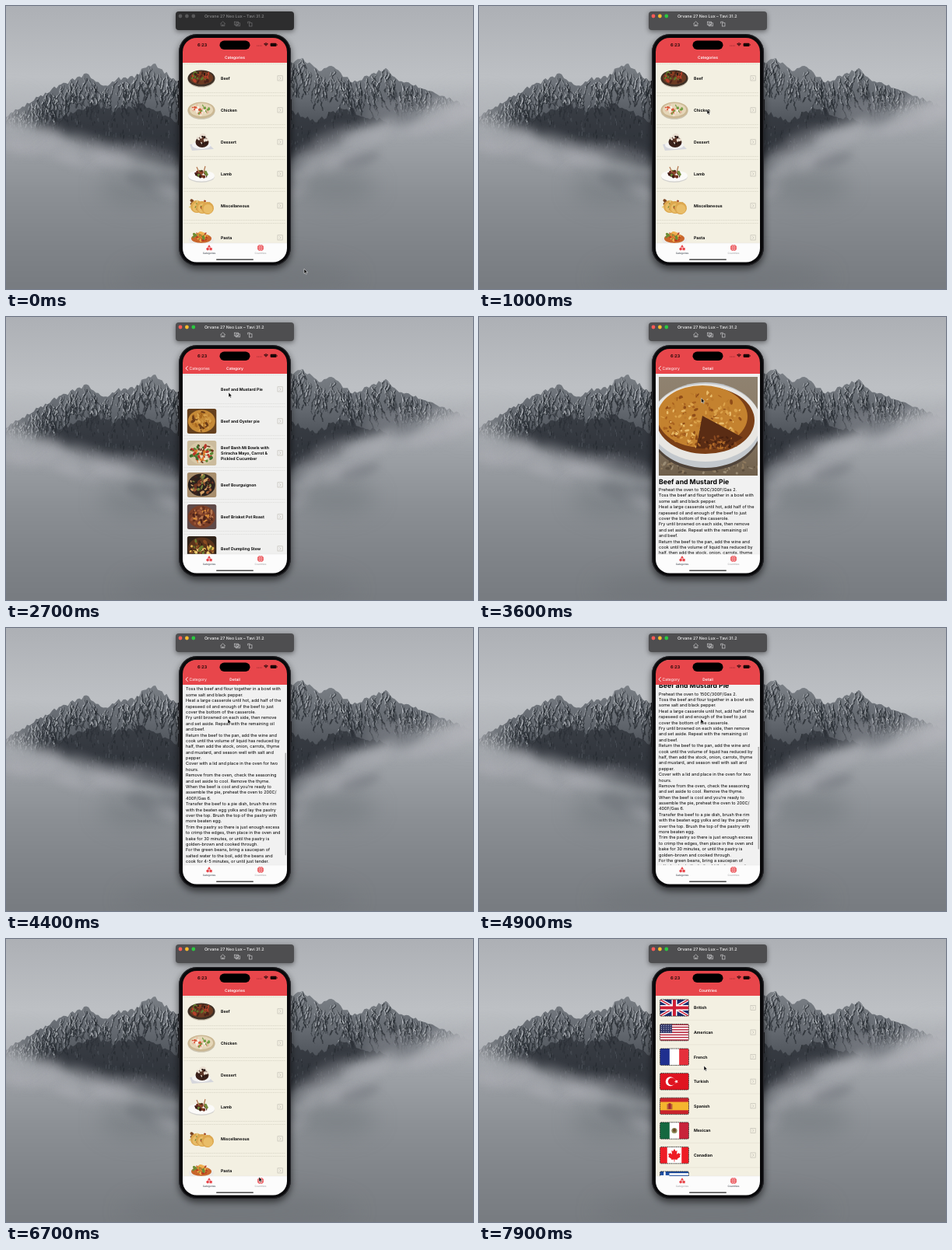
Animation of 600x364 px, one loop 8000 ms. Source, as an HTML page with a canvas:

```html
<!DOCTYPE html>
<html lang="en">
<head>
<meta charset="utf-8">
<title>Recipe app demo</title>
<style>
html, body { margin: 0; width: 100%; height: 100%; overflow: hidden; background: #8b8f93; }
canvas { display: block; width: 600px; height: 364px; }
</style>
</head>
<body>
<canvas id="stage"></canvas>
<script>
const W = 600, H = 364, LOOP = 8000, TAU = Math.PI * 2;
const SX = 227, SY = 41, SW = 134, TOP = 73, BOTTOM = 305;
const RED = '#e8464b';
const dpr = window.devicePixelRatio || 1;
const stage = document.getElementById('stage');
let ctx;

function prepare(canvas) {
  canvas.width = W * dpr;
  canvas.height = H * dpr;
  const c = canvas.getContext('2d');
  c.scale(dpr, dpr);
  c.textRendering = 'geometricPrecision';
  return c;
}

// ---------- helpers ----------
const clamp = (v, a = 0, b = 1) => Math.min(b, Math.max(a, v));
const smooth = u => u * u * (3 - 2 * u);

function random(seed) {
  return () => {
    seed = (seed + 0x6d2b79f5) | 0;
    let v = Math.imul(seed ^ (seed >>> 15), 1 | seed);
    v = (v + Math.imul(v ^ (v >>> 7), 61 | v)) ^ v;
    return ((v ^ (v >>> 14)) >>> 0) / 4294967296;
  };
}

// keys: [time, value...]; returns the eased values at t
function track(keys, t) {
  let i = 0;
  while (i < keys.length - 2 && t >= keys[i + 1][0]) i++;
  const a = keys[i], b = keys[i + 1];
  const u = smooth(clamp((t - a[0]) / (b[0] - a[0])));
  return a.slice(1).map((v, k) => v + (b[k + 1] - v) * u);
}

// critically damped transition
function spring(ms) {
  if (ms <= 0) return 0;
  const x = ms * 0.014;
  return x > 8 ? 1 : 1 - (1 + x) * Math.exp(-x);
}

function rect(x, y, w, h, fill) {
  ctx.fillStyle = fill;
  ctx.fillRect(x, y, w, h);
}

function round(x, y, w, h, r, fill) {
  ctx.beginPath();
  ctx.roundRect(x, y, w, h, r);
  if (fill) { ctx.fillStyle = fill; ctx.fill(); }
}

function oval(x, y, rx, ry, fill, turn = 0) {
  ctx.beginPath();
  ctx.ellipse(x, y, rx, ry, turn, 0, TAU);
  ctx.fillStyle = fill;
  ctx.fill();
}

function poly(points, fill) {
  ctx.beginPath();
  points.forEach(([x, y]) => ctx.lineTo(x, y));
  ctx.closePath();
  ctx.fillStyle = fill;
  ctx.fill();
}

function line(points, color, width) {
  ctx.beginPath();
  points.forEach(([x, y], i) => i ? ctx.lineTo(x, y) : ctx.moveTo(x, y));
  ctx.strokeStyle = color;
  ctx.lineWidth = width;
  ctx.stroke();
}

// y is the middle of the capitals
function text(str, x, y, size, weight, color, align = 'left') {
  ctx.font = `${weight} ${size}px Inter, "Liberation Sans", sans-serif`;
  ctx.textAlign = align;
  ctx.fillStyle = color;
  ctx.fillText(str, x, y + size * 0.36);
}

function clipped(path, draw) {
  ctx.save();
  path();
  ctx.clip();
  draw();
  ctx.restore();
}

// ---------- wallpaper ----------
function ridge(points, rough, seed) {
  const rnd = random(seed), out = [];
  for (let i = 0; i < points.length - 1; i++) {
    const [x0, y0] = points[i], [x1, y1] = points[i + 1];
    const n = Math.max(1, Math.round((x1 - x0) / 3));
    for (let k = 0; k < n; k++) {
      out.push([x0 + (x1 - x0) * k / n, y0 + (y1 - y0) * k / n + (rnd() - 0.5) * rough]);
    }
  }
  out.push(points[points.length - 1]);
  return out;
}

function gradient(y0, y1, stops) {
  const g = ctx.createLinearGradient(0, y0, 0, y1);
  stops.forEach((c, i) => g.addColorStop(i / (stops.length - 1), c));
  return g;
}

// jagged spurs running down from the ridge, snow on one side and rock on the other
function paintSpurs(peaks) {
  const rnd = random(21);
  for (let i = 0; i < 420; i++) {
    let [x, y] = peaks[Math.floor(rnd() * peaks.length)];
    const top = y, lean = (rnd() - 0.5) * 2.2;
    y += rnd() * 18;
    const steps = 4 + rnd() * 9;
    for (let k = 0; k < steps; k++) {
      const nx = x + lean + (rnd() - 0.5) * 5, ny = y + 1.5 + rnd() * 3.5;
      const snow = clamp(1 - (ny - top) / 48);
      const wide = 0.6 + rnd() * 1.5;
      ctx.globalAlpha = 0.3 + rnd() * 0.5;
      line([[x + 1, y], [nx + 1.4, ny + 1]], '#24292f', wide);
      if (rnd() < snow) line([[x, y], [nx, ny]], '#c2c6cb', wide * 0.8);
      x = nx;
      y = ny;
    }
  }
  ctx.globalAlpha = 1;
}

function paintWoods(woods) {
  const rnd = random(33);
  ctx.globalAlpha = 0.72;
  poly([...woods, [500, 250], [40, 250]], '#2b3037');
  for (let i = 0; i < 700; i++) {
    const [x, y] = woods[Math.floor(rnd() * woods.length)];
    const tx = x + (rnd() - 0.5) * 6, ty = y + rnd() * 60;
    ctx.globalAlpha = 0.25 + rnd() * 0.35;
    line([[tx, ty], [tx + rnd() - 0.5, ty + 2 + rnd() * 4]], rnd() < 0.35 ? '#5d636b' : '#1b2025', 1);
  }
  ctx.globalAlpha = 1;
}

function paintFog() {
  const edge = [[-40, 138], [30, 150], [70, 164], [110, 178], [160, 188], [215, 205], [366, 200],
    [410, 182], [445, 158], [500, 142], [560, 122], [640, 112]];
  ctx.filter = `blur(${8 * dpr}px)`;
  poly([...edge, [640, 420], [-40, 420]],
    gradient(120, H, ['#abaeb3', '#9b9fa4', '#8b8f94', '#808489', '#777b80']));
  ctx.filter = `blur(${6 * dpr}px)`;
  const rnd = random(14);
  ridge(edge, 10, 4).forEach(([x, y], i) => {
    if (i % 4) return;
    const near = clamp(1 - Math.abs(x - 300) / 260);
    const dark = rnd() < near * 0.75;
    ctx.globalAlpha = dark ? 0.4 : 0.28;
    oval(x, y + rnd() * 50 - (dark ? 0 : 12), 14 + rnd() * 20, 5 + rnd() * 7,
      dark ? '#5f646b' : '#b2b5ba', (x < 300 ? 0.3 : -0.3));
  });
  ctx.filter = `blur(${14 * dpr}px)`;
  ctx.globalAlpha = 0.45;
  oval(170, 235, 50, 22, '#6e7379');
  oval(425, 232, 50, 22, '#6e7379');
  oval(5, 140, 28, 22, '#b8bbbf');
  oval(595, 130, 34, 22, '#b8bbbf');
  oval(300, 350, 150, 25, '#6d7176');
  ctx.filter = 'none';
  ctx.globalAlpha = 1;
}

function paintWallpaper() {
  rect(0, 0, W, H, gradient(0, H, ['#adb0b5', '#bdc0c4', '#a4a8ad', '#8b8f94', '#777b80']));
  const peaks = ridge([[0, 142], [30, 124], [62, 106], [103, 87], [128, 104], [142, 94], [165, 91],
    [180, 78], [192, 76], [218, 96], [250, 84], [300, 90], [350, 80], [378, 67], [402, 83], [415, 76],
    [445, 98], [488, 81], [505, 96], [545, 110], [600, 132]], 5, 5);
  const body = () => {
    ctx.beginPath();
    peaks.forEach(([x, y]) => ctx.lineTo(x, y));
    ctx.lineTo(W, 260);
    ctx.lineTo(0, 260);
    ctx.closePath();
  };
  clipped(body, () => {
    rect(0, 60, W, 200, gradient(70, 210, ['#7b8086', '#656a71', '#464b52', '#3a3f46']));
    paintSpurs(peaks);
    paintWoods(ridge([[40, 156], [80, 139], [110, 126], [140, 135], [175, 126], [222, 148],
      [300, 150], [366, 136], [400, 147], [432, 130], [465, 142], [500, 152]], 8, 9));
  });
  paintFog();
}

function paintPhoneBody() {
  ctx.save();
  ctx.shadowColor = 'rgba(0,0,0,.6)';
  ctx.shadowBlur = 10 * dpr;
  ctx.shadowOffsetY = 4 * dpr;
  round(222, 36, 144, 298, 23, '#09090b');
  ctx.restore();
  rect(221, 96, 1.2, 10, '#17171a');
  rect(221, 114, 1.2, 17, '#17171a');
  rect(221, 136, 1.2, 17, '#17171a');
  rect(365.8, 120, 1.2, 27, '#17171a');
  round(222.6, 36.6, 142.8, 296.8, 22.5);
  ctx.strokeStyle = '#3a3a40';
  ctx.lineWidth = 0.7;
  ctx.stroke();
}

// ---------- food ----------
function specks(x, y, rx, ry, colors, seed, n) {
  const rnd = random(seed);
  for (let i = 0; i < n; i++) {
    const a = rnd() * TAU, d = Math.sqrt(rnd());
    oval(x + Math.cos(a) * rx * d, y + Math.sin(a) * ry * d, 1 + rnd() * 2.4, 0.6 + rnd() * 1.4,
      colors[i % colors.length], rnd() * 3);
  }
}

function plate(x, y, rim, inner, colors, seed) {
  oval(x, y + 1, 17.5, 10.8, 'rgba(90,70,40,.25)');
  oval(x, y, 17.5, 10.5, rim);
  oval(x, y - 0.5, 15, 8.5, inner);
  specks(x, y - 1.5, 12, 6.5, colors, seed, 34);
}

const dishes = [
  (x, y) => plate(x, y, '#3f3026', '#6b3a22', ['#4a2218', '#8c3c22', '#5d7a2c', '#b5402a', '#2c1a14'], 3),
  (x, y) => plate(x, y, '#cbb894', '#e5d6b8', ['#f4e4d2', '#e7b9a0', '#f8f0e4', '#6f9c40', '#d8583a'], 8),
  (x, y) => {
    poly([[x - 15, y + 3], [x + 8, y + 1], [x + 16, y + 9], [x - 12, y + 11]], '#d5d6dc');
    oval(x, y + 4, 12, 5, '#f4f3f2');
    oval(x + 1, y, 8.5, 7, '#3a211a');
    oval(x + 2, y - 7, 4.5, 4, '#eadfd2');
    specks(x + 1, y - 2, 6, 6, ['#23130f', '#5b3527', '#e9ddd0'], 6, 14);
  },
  (x, y) => {
    oval(x, y + 3.5, 17, 7.5, '#d4d3d0');
    oval(x, y + 2.5, 17, 7, '#fbfaf8');
    specks(x, y, 8, 4, ['#6b2d1c', '#8f4527', '#3f1d16', '#70893a'], 4, 24);
    line([[x - 3, y - 2], [x - 6, y - 9]], '#b47a55', 1.3);
    line([[x + 3, y - 2], [x + 5, y - 10]], '#b47a55', 1.3);
  },
  (x, y) => {
    for (let i = 0; i < 3; i++) {
      const cx = x - 7 + i * 7;
      specks(cx - 2, y - 2 + i, 7, 7, ['#6d8a34', '#a44a28', '#e8d28c', '#7a4422'], 12 + i, 12);
      oval(cx + 1, y + 1 + i, 8, 8, '#dca74e', 0.5);
      oval(cx + 1.5, y + 2 + i, 6, 6, '#e9bd68', 0.5);
    }
  },
  (x, y) => {
    oval(x, y + 3, 16, 7.5, '#eceae6');
    oval(x, y + 1, 13, 6, '#c9662b');
    specks(x, y - 1, 11, 5, ['#e28b35', '#b8371f', '#f0b04e', '#6c8c35'], 15, 34);
  },
];

function photo(x, y, base, plateColor, colors, seed) {
  clipped(() => round(x - 18.5, y - 16, 37.5, 32, 2.5), () => {
    rect(x - 19, y - 17, 40, 34, base);
    oval(x, y, 17.5, 14.5, plateColor);
    specks(x, y, 15, 12, colors, seed, 60);
  });
}

const meals = [
  ['Beef and Mustard Pie', '#6f5338', '#d9cfc0', ['#c07a2c', '#d59a45', '#6f3a18', '#a8611f']],
  ['Beef and Oyster pie', '#65401d', '#c58a37', ['#d29a45', '#be7f30', '#a9691f', '#dca853', '#6b3c18']],
  ['Beef Banh Mi Bowls with|Sriracha Mayo, Carrot &|Pickled Cucumber', '#cbbb9c', '#d8c9a8',
    ['#5c8a34', '#df752a', '#6b3420', '#f0e4c8', '#b8372a', '#3f6f2c']],
  ['Beef Bourguignon', '#a78d6c', '#2b211d', ['#6a3422', '#9c5a34', '#d6a368', '#3a211a', '#76803c']],
  ['Beef Brisket Pot Roast', '#5f4a48', '#7c3f27', ['#9b5636', '#4a2218', '#b67750', '#d88b3a', '#62301f']],
  ['Beef Dumpling Stew', '#2f2218', '#59331c', ['#e6b852', '#f0cf78', '#8a4c22', '#6b7f30', '#3a2213']],
];

// ---------- flags ----------
const bandsV = colors => (x, y, w, h) => colors.forEach((c, i) => rect(x + i * w / 3, y, w / 3 + 0.2, h, c));

function stripes(x, y, w, h, n, a, b) {
  for (let i = 0; i < n; i++) rect(x, y + i * h / n, w, h / n + 0.1, i % 2 ? b : a);
}

function star(x, y, r, color) {
  poly(Array.from({ length: 10 }, (_, i) => {
    const q = i % 2 ? r * 0.4 : r, a = i * TAU / 10 + Math.PI;
    return [x + Math.cos(a) * q, y + Math.sin(a) * q];
  }), color);
}

function cross(x, y, w, h, color, t) {
  rect(x, y + h / 2 - t / 2, w, t, color);
  rect(x + w / 2 - t / 2, y, t, h, color);
}

const flags = [
  ['British', (x, y, w, h) => {
    rect(x, y, w, h, '#1c2a6c');
    [['#fff', 4], ['#cf1f36', 1.5]].forEach(([c, t]) => {
      line([[x, y], [x + w, y + h]], c, t);
      line([[x, y + h], [x + w, y]], c, t);
    });
    cross(x, y, w, h, '#fff', 7);
    cross(x, y, w, h, '#cf1f36', 4);
  }],
  ['American', (x, y, w, h) => {
    stripes(x, y, w, h, 13, '#b82a40', '#fff');
    rect(x, y, w * 0.42, h * 0.54, '#343a6c');
    for (let i = 0; i < 20; i++) oval(x + 2 + (i % 5) * 2.9, y + 1.8 + Math.floor(i / 5) * 2.7, 0.5, 0.5, '#fff');
  }],
  ['French', bandsV(['#1f2f8f', '#fff', '#e5303c'])],
  ['Turkish', (x, y, w, h) => {
    rect(x, y, w, h, '#df1420');
    oval(x + w * 0.36, y + h / 2, 6, 6, '#fff');
    oval(x + w * 0.41, y + h / 2, 4.8, 4.8, '#df1420');
    star(x + w * 0.57, y + h / 2, 2.8, '#fff');
  }],
  ['Spanish', (x, y, w, h) => {
    rect(x, y, w, h, '#c8232c');
    rect(x, y + h / 4, w, h / 2, '#f5b52e');
    rect(x + 9, y + 8, 7, 7, '#b8603a');
    rect(x + 11, y + 7, 3, 7.5, '#a32630');
  }],
  ['Mexican', (x, y, w, h) => {
    bandsV(['#14683f', '#fff', '#c8233a'])(x, y, w, h);
    oval(x + w / 2, y + h / 2, 3.6, 3.6, '#8c8a58');
    oval(x + w / 2, y + h / 2 - 0.6, 2, 2.2, '#6d4b2c');
  }],
  ['Canadian', (x, y, w, h) => {
    rect(x, y, w, h, '#fff');
    rect(x, y, w / 4, h, '#ee1c25');
    rect(x + w * 0.75, y, w / 4, h, '#ee1c25');
    const half = [[0, -8], [1.8, -5], [3.6, -6], [3, -1.2], [5.4, -3.2], [6, -1.8], [8, -2],
      [7, 1], [7.8, 1.8], [3.6, 4.8], [4, 6], [0.4, 5.4], [0.4, 8.5]];
    const leaf = [...half, ...half.slice().reverse().map(([a, b]) => [-a, b])];
    poly(leaf.map(([a, b]) => [x + w / 2 + a, y + h / 2 + b]), '#ee1c25');
  }],
  ['Greek', (x, y, w, h) => {
    stripes(x, y, w, h, 9, '#1c4da0', '#fff');
    rect(x, y, 12, 12.2, '#1c4da0');
    cross(x, y, 12, 12.2, '#fff', 2.4);
  }],
];

// ---------- pages ----------
const categories = ['Beef', 'Chicken', 'Dessert', 'Lamb', 'Miscellaneous', 'Pasta', 'Pork', 'Seafood',
  'Side', 'Starter', 'Vegan', 'Vegetarian', 'Breakfast', 'Goat'];

const recipe = `Preheat the oven to 150C/300F/Gas 2.
Toss the beef and flour together in a bowl with
some salt and black pepper.
Heat a large casserole until hot, add half of the
rapeseed oil and enough of the beef to just
cover the bottom of the casserole.
Fry until browned on each side, then remove
and set aside. Repeat with the remaining oil
and beef.
Return the beef to the pan, add the wine and
cook until the volume of liquid has reduced by
half, then add the stock, onion, carrots, thyme
and mustard, and season well with salt and
pepper.
Cover with a lid and place in the oven for two
hours.
Remove from the oven, check the seasoning
and set aside to cool. Remove the thyme.
When the beef is cool and you're ready to
assemble the pie, preheat the oven to 200C/
400F/Gas 6.
Transfer the beef to a pie dish, brush the rim
with the beaten egg yolks and lay the pastry
over the top. Brush the top of the pastry with
more beaten egg.
Trim the pastry so there is just enough excess
to crimp the edges, then place in the oven and
bake for 30 minutes, or until the pastry is
golden-brown and cooked through.
For the green beans, bring a saucepan of
salted water to the boil, add the beans and
cook for 4-5 minutes, or until just tender.
Drain and toss with the butter, then season
with black pepper.
To serve, place a large spoonful of pie onto
each plate with green beans alongside.`.split('\n');

function arrowBox(x, y, color) {
  ctx.strokeStyle = color;
  ctx.lineWidth = 0.6;
  ctx.strokeRect(x + 122, y - 3.2, 6.2, 6.2);
  line([[x + 124.3, y - 1.7], [x + 126, y - 0.1], [x + 124.3, y + 1.5]], color, 0.7);
}

function dashedRule(x, y, color) {
  ctx.setLineDash([1.4, 0.9]);
  line([[x + 1, y], [x + 132.5, y]], color, 0.6);
  ctx.setLineDash([]);
}

function tallRow(x, y, label, color) {
  dashedRule(x, y - 18.5, color);
  dashedRule(x, y + 18.5, color);
  const lines = label.split('|');
  lines.forEach((s, i) => text(s, x + 49, y + (i - (lines.length - 1) / 2) * 6.7, 5.2, 700, '#0c0c0c'));
  arrowBox(x, y, '#bcb9b0');
}

function homePage(x, scroll) {
  rect(x, TOP, SW, BOTTOM - TOP, '#f3f0e2');
  categories.forEach((name, i) => {
    const y = 93 + i * 41 - scroll;
    if (y < 50 || y > 330) return;
    tallRow(x, y, name, '#cdc9bb');
    dishes[i % dishes.length](x + 24, y);
  });
}

function mealPage(x, t) {
  rect(x, TOP, SW, BOTTOM - TOP, '#f0f0ef');
  meals.forEach(([name, base, dish, colors], i) => {
    const y = 93 + i * 41;
    tallRow(x, y, name, '#d3d3d2');
    if (t > (i ? 2350 + i * 40 : 2780)) photo(x + 24.3, y, base, dish, colors, 40 + i);
  });
}

function piePhoto(x, y, size) {
  clipped(() => { ctx.beginPath(); ctx.rect(x, y, size, size); }, () => {
    rect(x, y, size, size, gradient(y, y + size, ['#8f8270', '#8b7b66', '#6f5f4b']));
    specks(x + 64, y + 116, 64, 10, ['#8f7a5e', '#5b4c3b', '#9a8b74'], 76, 60);
    oval(x + 60, y + 66, 72, 55, '#50443a');
    oval(x + 60, y + 62, 72, 55, '#c3c8cd');
    oval(x + 60, y + 59, 71, 50, '#e8e6e2');
    oval(x + 60, y + 56, 63, 43, '#7a3f17');
    oval(x + 56, y + 51, 58, 40, '#c4822f');
    specks(x + 56, y + 55, 52, 36, ['#dba24a', '#a9621f', '#bd7a2b', '#e9bd6c', '#8f4c18'], 77, 190);
    poly([[x + 56, y + 50], [x + 108, y + 78], [x + 84, y + 93], [x + 48, y + 92]], '#5a2c14');
    specks(x + 74, y + 85, 26, 9, ['#8a4a20', '#47200f', '#b06a28'], 78, 40);
  });
}

function detailPage(x, scroll) {
  ctx.save();
  ctx.shadowColor = 'rgba(0,0,0,.15)';
  ctx.shadowBlur = 3 * dpr;
  rect(x, TOP, SW, BOTTOM - TOP, '#f1f1f1');
  ctx.restore();
  const top = TOP - scroll;
  piePhoto(x + 4, top + 4, 127);
  text('Beef and Mustard Pie', x + 4, top + 138.4, 8.7, 700, '#000');
  recipe.forEach((s, i) => {
    const y = top + 149 + i * 7.39;
    if (y > 65 && y < 312) text(s, x + 4, y, 5.55, 400, '#000');
  });
}

function countryPage(x) {
  rect(x, TOP, SW, BOTTOM - TOP, '#f3f0e2');
  flags.forEach(([name, paint], i) => {
    const y = 88.5 + i * 31.6, fx = x + 5.5, fy = y - 10.7, w = 37, h = 21.4;
    clipped(() => round(fx, fy, w, h, 1.5), () => paint(fx, fy, w, h));
    round(fx, fy, w, h, 1.5);
    ctx.setLineDash([1.6, 0.8]);
    ctx.strokeStyle = '#111';
    ctx.lineWidth = 0.8;
    ctx.stroke();
    ctx.setLineDash([]);
    text(name, x + 49, y, 5.2, 700, '#0c0c0c');
    arrowBox(x, y, '#bcb9b0');
    line([[x + 5, y + 15.8], [x + SW, y + 15.8]], '#dcd8ca', 0.5);
  });
}

function scrollBar(scroll, content, alpha) {
  if (alpha <= 0) return;
  const view = BOTTOM - TOP, size = view * view / content;
  const y = TOP + 1 + Math.max(0, scroll) / content * view;
  round(358.6, y, 1.2, size - 1, 0.6, `rgba(70,70,70,${0.5 * alpha})`);
}

// ---------- chrome ----------
function backButton(label, alpha) {
  if (alpha <= 0.01) return;
  ctx.globalAlpha = alpha;
  line([[233.6, 63.2], [230.9, 66], [233.6, 68.8]], '#fff', 0.9);
  text(label, 235.6, 66, 5.1, 400, '#fff');
  ctx.globalAlpha = 1;
}

function navBar(t, p1, p2, countries) {
  rect(SX, SY, SW, TOP - SY, RED);
  const fade = p => clamp((p - 0.2) / 0.5);
  const f1 = fade(p1), f2 = fade(p2);
  const title = (s, a) => {
    ctx.globalAlpha = a;
    text(s, 294, 66, 4.9, 600, '#fff', 'center');
    ctx.globalAlpha = 1;
  };
  title(countries ? 'Countries' : 'Categories', 1 - f1);
  title('Category', f1 * (1 - f2));
  title('Detail', f2);
  const pressed = (a, b) => t > a && t < b ? 0.4 : 1;
  backButton('Categories', f1 * (1 - f2) * pressed(6000, 6400));
  backButton('Category', f2 * pressed(5440, 5800));

  text('6:23', 246, 50, 5.4, 700, '#230808');
  round(274.5, 44.5, 39, 11.5, 5.75, '#000');
  for (let i = 0; i < 4; i++) oval(322.8 + i * 1.8, 51, 0.5, 0.5, '#7a2025');
  ctx.strokeStyle = '#1a0606';
  ctx.lineWidth = 0.9;
  [1.4, 2.8, 4.1].forEach(r => {
    ctx.beginPath();
    ctx.arc(334, 52, r, -2.3, -0.84);
    ctx.stroke();
  });
  round(339.6, 47.8, 8, 4.2, 1.2, '#1a0606');
  rect(348, 49.2, 0.6, 1.5, '#1a0606');
}

function tabBar(countries) {
  rect(SX, BOTTOM, SW, 25, '#fcfcfc');
  line([[SX, BOTTOM], [SX + SW, BOTTOM]], '#dedede', 0.4);
  poly([[261, 307], [263.2, 310.4], [258.8, 310.4]], RED);
  oval(259.1, 312.6, 1.8, 1.8, RED);
  rect(261.5, 311, 3.2, 3.2, RED);
  oval(327, 311, 4, 4, RED);
  ctx.strokeStyle = '#fbdcdd';
  ctx.lineWidth = 0.45;
  ctx.beginPath();
  ctx.ellipse(327, 311, 1.8, 4, 0, 0, TAU);
  ctx.stroke();
  line([[323, 311], [331, 311]], '#fbdcdd', 0.45);
  line([[327, 307], [327, 315]], '#fbdcdd', 0.45);
  line([[324, 308.8], [330, 308.8]], '#fbdcdd', 0.35);
  line([[324, 313.2], [330, 313.2]], '#fbdcdd', 0.35);
  const on = '#3d444e', off = '#a3a3a7';
  text('Categories', 261, 318.2, 3.2, 500, countries ? off : on, 'center');
  text('Countries', 327, 318.2, 3.2, 500, countries ? on : off, 'center');
  round(270, 325.4, 48, 1.4, 0.7, '#222');
}

function toolbar(active) {
  ctx.save();
  ctx.shadowColor = 'rgba(0,0,0,.45)';
  ctx.shadowBlur = 6 * dpr;
  ctx.shadowOffsetY = 2 * dpr;
  round(218, 7, 152, 24, 4, active ? '#4e4e50' : '#2d2d2e');
  ctx.restore();
  ['#fc5b57', '#f9bb2d', '#2bc840'].forEach((c, i) =>
    oval(224 + i * 8.4, 13, 2.4, 2.4, active ? c : '#59595a'));
  text('Orvane 27 Neo Lux – Tavi 31.2', 255, 13, 5.3, 600, active ? '#e0e0e0' : '#7e7e7f');
  const ink = active ? '#c6c6c8' : '#707072';
  line([[275.4, 22.8], [278.6, 20], [281.8, 22.8]], ink, 0.7);
  line([[276.4, 22.3], [276.4, 25.6], [280.8, 25.6], [280.8, 22.3]], ink, 0.7);
  rect(278, 23.6, 1.2, 2, ink);
  ctx.strokeStyle = ink;
  ctx.strokeRect(293.6, 20.2, 5, 4);
  ctx.strokeRect(295.4, 21.8, 5, 4);
  oval(297.9, 23.8, 0.9, 0.9, ink);
  ctx.strokeRect(312.4, 21.8, 3.6, 4.2);
  line([[310.6, 22.6], [310.6, 20.3], [314, 20.3]], ink, 0.7);
}

function cursor(x, y) {
  const shape = [[0, 0], [0, 6.2], [1.4, 5], [2.4, 7.1], [3.4, 6.6], [2.5, 4.6], [4.4, 4.5]];
  const pts = shape.map(([a, b]) => [x + a, y + b]);
  poly(pts, '#050505');
  ctx.lineJoin = 'round';
  ctx.strokeStyle = 'rgba(255,255,255,.85)';
  ctx.lineWidth = 0.6;
  ctx.stroke();
  ctx.lineJoin = 'miter';
}

// ---------- timeline ----------
const pointerKeys = [[0, 383, 338], [150, 383, 338], [900, 293, 133], [1650, 293, 133], [2000, 286, 97],
  [3500, 286, 97], [3750, 285, 117], [5050, 285, 117], [5400, 247, 66], [6150, 247, 66],
  [6650, 325, 306], [7250, 325, 306], [7800, 289, 163], [8000, 289, 163]];
const homeKeys = [[0, 0], [1050, 0], [1300, 150], [1540, -5], [1800, 0], [8000, 0]];
const detailKeys = [[0, 0], [3650, 0], [4400, 151], [4550, 165], [4700, 165], [5200, 87], [8000, 87]];
const pulse = (t, a, b) => clamp((t - a) / 100) * clamp((b - t) / 250);

const backdrop = document.createElement('canvas');
ctx = prepare(backdrop);
paintWallpaper();
paintPhoneBody();
ctx = prepare(stage);

function draw(t) {
  const p1 = spring(t - 2100) - spring(t - 6050);
  const p2 = spring(t - 3000) - spring(t - 5536);
  const countries = t >= 6950;
  const [homeScroll] = track(homeKeys, t);
  const [detailScroll] = track(detailKeys, t);

  ctx.drawImage(backdrop, 0, 0, W, H);
  toolbar(t >= 1000);
  clipped(() => round(SX, SY, SW, 288.5, 18), () => {
    if (countries) countryPage(SX);
    else {
      if (p1 < 0.999) homePage(SX - 0.3 * SW * p1, homeScroll);
      if (p1 > 0.002) mealPage(SX + SW * (1 - p1) - 0.3 * SW * p2, t);
      if (p2 > 0.002) detailPage(SX + SW * (1 - p2), detailScroll);
    }
    scrollBar(homeScroll, 598, pulse(t, 1000, 2000));
    scrollBar(detailScroll, 405, pulse(t, 3650, 5450));
    navBar(t, p1, p2, countries);
    tabBar(countries);
  });
  cursor(...track(pointerKeys, t));
}

const start = performance.now();
function loop() {
  draw((performance.now() - start) % LOOP);
  requestAnimationFrame(loop);
}
loop();
</script>
</body>
</html>
```
